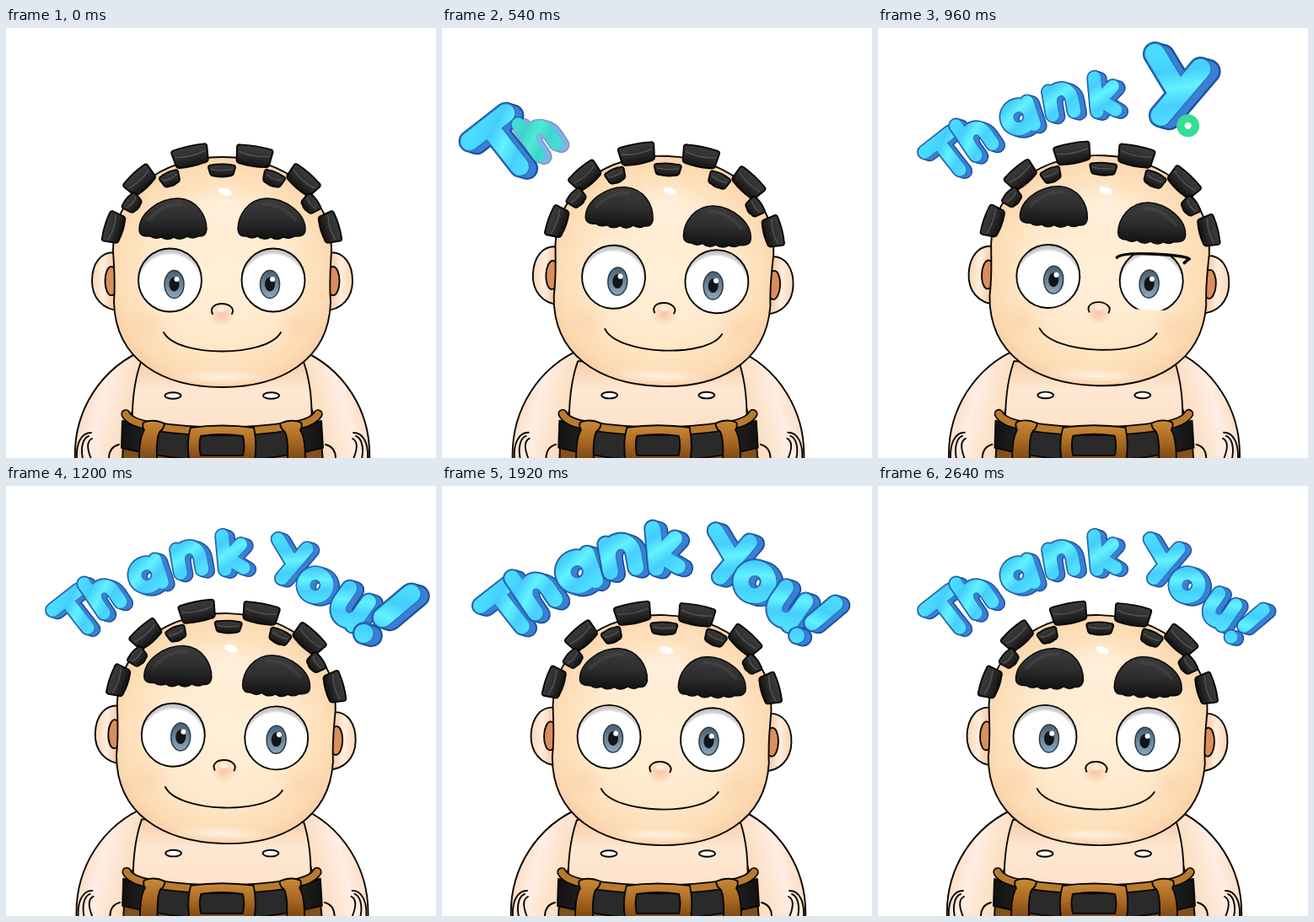
An HTML page that plays this animation: 510x510 px, repeating every 2.73 s.

```html
<!DOCTYPE html>
<html lang="en">
<head>
<meta charset="utf-8">
<title>Thank You!</title>
<style>
html, body { margin: 0; width: 100%; height: 100%; overflow: hidden; background: #fff; }
svg { display: block; width: 100vw; height: 100vh; }
.line { fill: none; stroke: #080604; stroke-width: 1.9; stroke-linecap: round; stroke-linejoin: round; }
.ink { stroke: #080604; stroke-width: 1.9; stroke-linejoin: round; }
.letter path { fill: none; stroke-linecap: round; stroke-linejoin: round; }
#lid { stroke-width: 3.5; }
</style>
</head>
<body>
<svg viewBox="0 0 510 510" role="img" aria-label="Thank You!">
<defs>
  <radialGradient id="skin" gradientUnits="userSpaceOnUse" cx="256" cy="290" r="160">
    <stop offset="0" stop-color="#fff0d9"/><stop offset=".5" stop-color="#ffeacd"/>
    <stop offset=".78" stop-color="#fddcb4"/><stop offset="1" stop-color="#f5c49c"/>
  </radialGradient>
  <linearGradient id="armSkin" gradientUnits="userSpaceOnUse" x1="84" y1="460" x2="160" y2="480">
    <stop offset="0" stop-color="#fbd9c0"/><stop offset=".3" stop-color="#ffeee3"/><stop offset="1" stop-color="#fbd4ae"/>
  </linearGradient>
  <linearGradient id="chest" x1="0" y1="0" x2="0" y2="1">
    <stop offset="0" stop-color="#f5cda8"/><stop offset=".4" stop-color="#fee8d3"/><stop offset="1" stop-color="#fde0c6"/>
  </linearGradient>
  <linearGradient id="earSkin" x1="0" y1="0" x2="1" y2="0">
    <stop offset="0" stop-color="#fbd5b4"/><stop offset=".4" stop-color="#ffeedd"/><stop offset="1" stop-color="#f0b183"/>
  </linearGradient>
  <radialGradient id="white" cx=".5" cy=".59" r=".58">
    <stop offset=".84" stop-color="#fff"/><stop offset=".9" stop-color="#d2d1d4"/><stop offset="1" stop-color="#bdbcc0"/>
  </radialGradient>
  <linearGradient id="iris" x1="0" y1="0" x2="0" y2="1">
    <stop offset="0" stop-color="#4b6072"/><stop offset="1" stop-color="#8ba8bd"/>
  </linearGradient>
  <linearGradient id="hair" x1="0" y1="0" x2="0" y2="1">
    <stop offset="0" stop-color="#3b3b3b"/><stop offset=".45" stop-color="#303030"/><stop offset="1" stop-color="#111"/>
  </linearGradient>
  <linearGradient id="leather" x1="0" y1="0" x2="0" y2="1">
    <stop offset="0" stop-color="#c98a38"/><stop offset=".5" stop-color="#ab6a23"/><stop offset="1" stop-color="#7a4713"/>
  </linearGradient>
  <linearGradient id="belt" x1="0" y1="0" x2="1" y2="0">
    <stop offset="0" stop-color="#111"/><stop offset=".2" stop-color="#2a2a2a"/>
    <stop offset=".8" stop-color="#2a2a2a"/><stop offset="1" stop-color="#111"/>
  </linearGradient>
  <radialGradient id="blush"><stop offset="0" stop-color="#f7a27c" stop-opacity=".55"/><stop offset="1" stop-color="#f7a27c" stop-opacity="0"/></radialGradient>
  <radialGradient id="glow"><stop offset="0" stop-color="#fff" stop-opacity=".6"/><stop offset="1" stop-color="#fff" stop-opacity="0"/></radialGradient>
  <linearGradient id="ice" gradientUnits="userSpaceOnUse" x1="-18" y1="-42" x2="6" y2="4">
    <stop offset="0" stop-color="#4adcff"/><stop offset=".25" stop-color="#45cdfb"/>
    <stop offset=".5" stop-color="#62f2ff"/><stop offset=".75" stop-color="#46cffc"/><stop offset="1" stop-color="#50dfff"/>
  </linearGradient>
  <clipPath id="slit"><rect id="slitBox" x="-45" width="90"/></clipPath>

  <path id="arm" class="ink" fill="url(#armSkin)" d="M168 380C112 402 79 455 82 514H160L148 460 168 395Z"/>
  <g id="hand" class="line">
    <path d="M84 511C83 493 89 480 101 480"/><path d="M91 511C88 496 92 486 98 484"/>
    <path d="M101 511C96 499 96 490 102 487"/><path d="M122 511C122 502 126 496 134 494"/>
  </g>
  <g id="ear">
    <path class="ink" fill="url(#earSkin)" d="M134 267C111 262 102 282 102 300C102 319 114 335 136 335Z"/>
    <ellipse class="ink" fill="#d98e5c" cx="125" cy="300" rx="7.5" ry="17"/>
  </g>
  <g id="brow">
    <path fill="url(#hair)" stroke="#0b0b0b" stroke-width="1.5" d="M158 239C158 219 182 202 204 202C227 203 238 223 238 239Q237 248 228 247Q222 251 215 247Q207 253 199 248Q191 253 184 248Q176 251 171 247Q158 248 158 239Z"/>
    <path d="M170 227Q187 208 208 209" fill="none" stroke="#555" stroke-width="4" opacity=".35" stroke-linecap="round"/>
  </g>
  <path id="loop" class="ink" fill="url(#leather)" d="M163 468Q174 463 188 469Q187 476 183 478Q178 484 179 512L158 511Q158 486 164 477Q161 472 163 468Z"/>
  <path id="rim" d="M142 458Q147 468 172 472Q256 485 340 472Q364 468 370 458" fill="none" stroke-linecap="round"/>
</defs>

<g id="body">
  <use href="#arm"/><use href="#arm" transform="translate(513) scale(-1 1)"/>
  <path class="ink" fill="url(#chest)" d="M160 396Q148 430 150 480H362Q365 430 353 396Z"/>
  <g class="ink" fill="#fff"><ellipse cx="198" cy="436" rx="9.5" ry="3.8"/><ellipse cx="314.5" cy="436" rx="9.5" ry="3.8"/></g>
  <path class="ink" fill="#80501d" d="M140 468Q256 490 372 468L376 514H138Z"/>
  <path class="ink" fill="url(#belt)" d="M138 466Q256 500 374 466L376 498Q256 528 137 498Z"/>
  <use href="#rim" stroke="#080604" stroke-width="11.5"/><use href="#rim" stroke="#b87a2f" stroke-width="8"/>
  <use href="#loop"/><use href="#loop" transform="translate(513) scale(-1 1)"/>
  <path class="ink" fill="url(#leather)" fill-rule="evenodd" d="M219 474Q256 469 294 474Q298 492 295 512H217Q214 490 219 474ZM231 484Q228 495 231 507H281Q284 495 281 484Q256 480 231 484Z"/>
  <use href="#hand"/><use href="#hand" transform="translate(513) scale(-1 1)"/>
</g>

<g id="head">
  <use href="#ear"/><use href="#ear" transform="translate(513) scale(-1 1)"/>
  <path class="ink" fill="url(#skin)" d="M127 263C127 198 182 153 256 153C331 153 386 198 386 263C385 285 383 300 385 325C383 395 325 426 256 426C187 426 130 395 128 325C130 300 128 285 127 263Z"/>
  <ellipse cx="258" cy="215" rx="50" ry="35" fill="url(#glow)" opacity=".5"/>
  <ellipse cx="256" cy="414" rx="65" ry="9" fill="url(#glow)"/>
  <g id="hairs"></g>
  <ellipse cx="260" cy="194.5" rx="8" ry="4.3" fill="#fff" transform="rotate(14 260 194)"/>
  <g id="face">
    <ellipse cx="166" cy="352" rx="30" ry="22" fill="url(#blush)" opacity=".25"/>
    <ellipse cx="347" cy="352" rx="30" ry="22" fill="url(#blush)" opacity=".25"/>
    <g id="browL"><use href="#brow"/></g>
    <g id="browR"><use href="#brow" transform="translate(513) scale(-1 1)"/></g>
    <g id="eyes"></g>
    <path id="lid" class="line" d="M-42 0Q-36 -6 0 -6Q38 -6 44 -2Q41 0 38 3"/>
    <ellipse cx="256" cy="340" rx="16" ry="14" fill="url(#blush)"/>
    <path class="line" d="M245 339C241 332 248 327 256 327C264 327 272 332 268 339"/>
    <ellipse cx="256" cy="334" rx="5" ry="3" fill="#fff" opacity=".55"/>
    <path class="line" d="M187 361C203 391 309 391 326 361"/>
  </g>
</g>
<g id="words"></g>
</svg>
<script>
const $ = id => document.getElementById(id);
const place = (el, value) => el.setAttribute('transform', value);

// Hair tufts: x, y, width, height, angle
$('hairs').innerHTML = [
  [219, 152, 43, 22, -13], [294, 152, 43, 22, 9], [159, 181, 38, 21, -43], [352, 181, 40, 21, 41],
  [128, 237, 37, 20, -73], [384, 237, 37, 20, 73], [256, 169, 32, 13, 0], [195, 179, 24, 15, -25],
  [317, 179, 26, 15, 23], [150, 208, 23, 16, -50], [361, 209, 23, 16, 52]
].map(([x, y, w, h, a]) => {
  const r = w / 2, b = h / 2;
  return `<g transform="translate(${x} ${y}) rotate(${a})">
    <path class="ink" fill="url(#hair)" d="M${-r} ${3 - b}Q${-r} ${-b} ${4 - r} ${-b}Q0 ${-b - 2} ${r - 4} ${-b}Q${r} ${-b} ${r} ${3 - b}L${r - 2} ${b - 3}Q${r - 3} ${b} ${r - 7} ${b}Q0 ${b + 2} ${7 - r} ${b}Q${3 - r} ${b} ${2 - r} ${b - 3}Z"/>
    <path d="M${3 - r} ${-b * .25}Q0 ${b * .2} ${r - 3} ${-b * .25}" fill="none" stroke="#555" stroke-width="1.3"/></g>`;
}).join('');

$('eyes').innerHTML = [[194.5, 5], [317, -4]].map(([x, look], i) => `
  <g transform="translate(${x} 299)"><g ${i ? 'clip-path="url(#slit)"' : ''}>
    <circle class="ink" r="37.5" fill="url(#white)"/>
    <g class="pupil" data-x="${look}">
      <ellipse rx="11.5" ry="16.5" fill="url(#iris)" stroke="#2b3a47" stroke-width="1.5"/>
      <ellipse rx="6" ry="8.5" fill="#10151a"/><circle cx="3" cy="-6" r="3" fill="#fff"/>
    </g></g></g>`).join('');

// Letters: strokes, baseline x and y, angle, x of the inner corner from the baseline point
const letters = [
  ['M-20-42H18M0-42V0', 97, 168, -38, 11],
  ['M-12-42V0M-12-13C-12-33 12-33 12-14V0', 126, 144, -34, 19],
  ['M11-14A14 14 0 1 1-17-14A14 14 0 1 1 11-14M12-28V0', 174, 118, -18, 29],
  ['M-13-28V0M-13-13C-13-34 13-34 13-14V0', 220, 101, -10, 27],
  ['M-11-40V0M10-28L-7-13L11 0', 271, 98, -5, 21],
  ['M17-44L1-1M-19-43L7-22', 326, 110, 20, -13],
  ['M14-15A14 14 0 1 1-14-15A14 14 0 1 1 14-15', 360, 131, 27, -17],
  ['M-12-29V-14C-12 5 12 5 12-14M12-29V0', 398, 158, 35, -12],
  ['M0-50V-20M0 0V.1', 419, 179, 50, -12]
].map(([d, x, y, angle, corner]) => {
  const g = document.createElementNS('http://www.w3.org/2000/svg', 'g');
  const stroke = (color, width, shift = 0) =>
    `<path d="${d}" transform="translate(${shift} ${shift * .3}) rotate(${angle})" stroke="${color}" stroke-width="${width}"/>`;
  g.setAttribute('class', 'letter');
  g.innerHTML = `<g class="side">${[0, 3, 6].map(n => stroke('#1b5096', 18.5, n)).join('')}
    ${[2, 4, 6].map(n => stroke('#3a7fd6', 15.5, n)).join('')}${stroke('#2a74c4', 17)}</g>
    ${stroke('url(#ice)', 15)}<g class="fresh">${stroke('#35df91', 15)}</g>`;
  $('words').append(g);
  return { g, x, y, angle, corner, side: g.querySelector('.side'), fresh: g.querySelector('.fresh') };
});

// Interpolates rows of [time, ...values] with a soft ease
function sample(rows, t) {
  const i = rows.findIndex(row => row[0] > t);
  if (i < 0) return rows.at(-1).slice(1);
  if (!i) return rows[0].slice(1);
  const [a, b] = [rows[i - 1], rows[i]];
  const u = (t - a[0]) / (b[0] - a[0]), e = u * u * (3 - 2 * u);
  return a.slice(1).map((v, k) => v + (b[k + 1] - v) * e);
}

// time, tilt, face x, head y, left brow, right brow, look x, look y, breath
const pose = [
  [0, 0, 0, 0, 0, 0, 0, 5, 0],
  [300, 2.2, 3.5, -.5, -9, 7, 0, 5, .5],
  [780, 3, 3, -2, -11, 8, 0, 5, 1],
  [1200, 1.7, 0, -2, -9, -1, 4, 2, .7],
  [1620, 1.6, 0, 0, -8, -1, 0, 2, 0]
];
const wink = [[600, 0], [690, 1], [900, 1], [990, 0]];
const pop = [[0, .3], [30, .62], [90, 1.46], [120, 1.58], [210, 1]];

function drawBody(t) {
  const [tilt, dx, dy, left, right, lookX, lookY, breath] = sample(pose, t);
  const [shut] = sample(wink, t);
  place($('body'), `translate(256 510) scale(${1 - .014 * breath} ${1 + .008 * breath}) translate(-256 -510)`);
  place($('head'), `translate(0 ${dy}) rotate(${tilt} 256 425)`);
  place($('face'), `translate(${dx})`);
  place($('browL'), `translate(0 ${left})`);
  place($('browR'), `translate(0 ${right})`);
  document.querySelectorAll('.pupil').forEach(p => place(p, `translate(${+p.dataset.x + lookX} ${lookY})`));
  const top = -40 + 37 * shut;
  $('slitBox').setAttribute('y', top);
  $('slitBox').setAttribute('height', 40 - 22 * shut - top);
  $('lid').style.display = shut > .05 ? '' : 'none';
  place($('lid'), `translate(317 ${299 - 35 * (1 - shut)})`);
}

function drawLetters(t) {
  const swell = t > 1500 && t < 2130 ? .24 * Math.sin(Math.PI * (t - 1500) / 630) ** 2 : 0;
  letters.forEach(({ g, x, y, angle, corner, side, fresh }, i) => {
    const age = t - 390 - 90 * i;
    g.style.display = age > 0 ? '' : 'none';
    if (age <= 0) return;
    const size = sample(pop, age)[0] + swell;
    // Small letters grow from the middle, large ones from the inner corner
    const a = angle * Math.PI / 180;
    const [ox, oy] = size < 1 ? [20 * Math.sin(a), -20 * Math.cos(a)] : [corner, 9];
    place(g, `translate(${x + ox * (1 - size)} ${y + oy * (1 - size)}) scale(${size})`);
    const blue = Math.min(1, Math.max(0, (age - 30) / 50));
    side.style.opacity = blue;
    fresh.style.opacity = 1 - blue;
  });
}

const start = performance.now();
function frame() {
  const t = Math.floor((performance.now() - start) % 2730 / 30) * 30;
  drawBody(t);
  drawLetters(t);
  requestAnimationFrame(frame);
}
frame();
</script>
</body>
</html>
```
